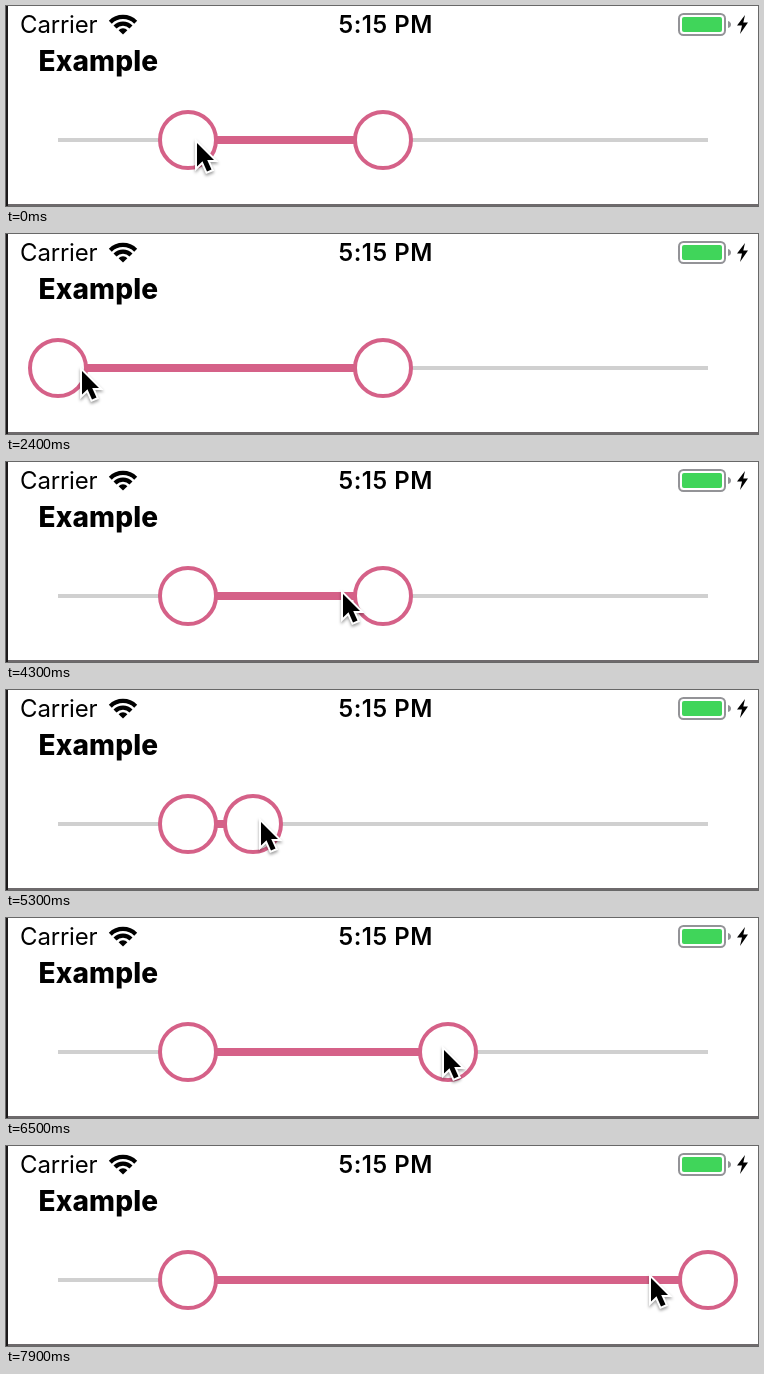
Recreate the animation shown at these times as an HTML page. Size 752x200 px, loop 8 s.

```html
<!DOCTYPE html>
<html lang="en">
<head>
<meta charset="utf-8">
<title>Range slider</title>
<style>
  html, body { margin: 0; width: 100%; height: 100%; overflow: hidden; background: #fff; }
  svg { display: block; }
  text { font-family: Inter, Roboto, sans-serif; }
  .knob { fill: #fff; stroke: #d56188; stroke-width: 4; }
  #cursor { filter: drop-shadow(0 2px 1.5px rgba(0, 0, 0, .38)); }
</style>
</head>
<body>
<svg width="752" height="200" viewBox="0 0 752 200">
  <rect width="752" height="200" fill="#fff"/>
  <rect y="198" width="752" height="2" fill="#6e6a6c"/>
  <rect width="2" height="200" fill="#1c1a1b"/>

  <text x="14" y="27" font-size="24" letter-spacing="-.15">Carrier</text>
  <g fill="none" stroke="#000" stroke-width="4.2">
    <path d="M104.3 16.2a18 18 0 0 1 25.4 0"/>
    <path d="M109 21a11.3 11.3 0 0 1 16 0"/>
    <path d="M112.6 24.2a6.2 6.2 0 0 1 8.8 0L117 28.6z" fill="#000" stroke="none"/>
  </g>
  <text x="332.5" y="27" font-size="24" font-weight="600" letter-spacing=".5">5:15 PM</text>
  <rect x="673" y="8" width="46" height="21" rx="4.5" fill="none" stroke="#939397" stroke-width="2"/>
  <rect x="676" y="11" width="40" height="15" rx="2" fill="#40d55a"/>
  <path d="M722 15q3 1 3 3.500t-3 3.500z" fill="#939397"/>
  <path d="M739 9L731 19.500H736L734 28L742 16.500H737.300z"/>
  <text x="32.500" y="65" font-size="28" font-weight="800" letter-spacing=".15">Example</text>

  <rect x="52" y="132" width="650" height="4" fill="#d0d0d0"/>
  <rect id="range" y="130" height="8" fill="#d56188"/>
  <circle id="low" class="knob" cy="134" r="28"/>
  <circle id="high" class="knob" cy="134" r="28"/>
  <path id="cursor" d="M0 0V23.500L5.500 18.200L10 28.500L14.500 26.600L10.200 17H17z"
        stroke="#fff" stroke-width="4" paint-order="stroke"/>
</svg>
<script>
const LOOP = 8000, TICK = 100;
const TRACK_START = 52, STEP = 65;

const linear = k => k;
const smooth = k => k * k * (3 - 2 * k);
const easeIn = k => k ** 3;
const easeOut = k => 1 - (1 - k) ** 3;

const move = (start, end, to, ease = linear) => ({ start, end, to, ease });

// Returns a function of time that runs through the moves and holds between them.
const track = (from, ...moves) => t => moves.reduce((value, { start, end, to, ease }) => {
  const k = Math.min(1, Math.max(0, (t - start) / (end - start)));
  return value + (to - value) * ease(k);
}, from);

const pointerX = track(191,
  move(1100, 1750, 68, smooth),
  move(2300, 2800, 147, smooth),
  move(2800, 3700, 369, easeOut),
  move(4000, 4900, 247, smooth),
  move(4900, 5900, 369, easeIn),
  move(5900, 6700, 461),
  move(6700, 7900, 645));
const pointerY = track(137, move(2800, 3300, 132, easeOut));

// Handle positions in slider steps; the handles snap to whole ones.
const lowValue = track(2, move(1500, 1700, 0), move(2400, 2700, 2));
const highValue = track(5,
  move(4300, 4700, 3),
  move(5400, 5700, 5),
  move(6200, 6300, 6),
  move(6700, 7000, 8),
  move(7600, 7900, 10));

const snap = value => TRACK_START + Math.round(value) * STEP;

const set = (id, attrs) => {
  const element = document.getElementById(id);
  for (const name in attrs) element.setAttribute(name, attrs[name]);
};

function draw(time) {
  const t = Math.floor((time % LOOP) / TICK) * TICK;
  const low = snap(lowValue(t)), high = snap(highValue(t));
  const x = Math.round(pointerX(t)), y = Math.round(pointerY(t));
  set('low', { cx: low });
  set('high', { cx: high });
  set('range', { x: low, width: high - low });
  set('cursor', { transform: `translate(${x} ${y})` });
}

const begin = performance.now();
function frame() {
  draw(performance.now() - begin);
  requestAnimationFrame(frame);
}
frame();
</script>
</body>
</html>
```
